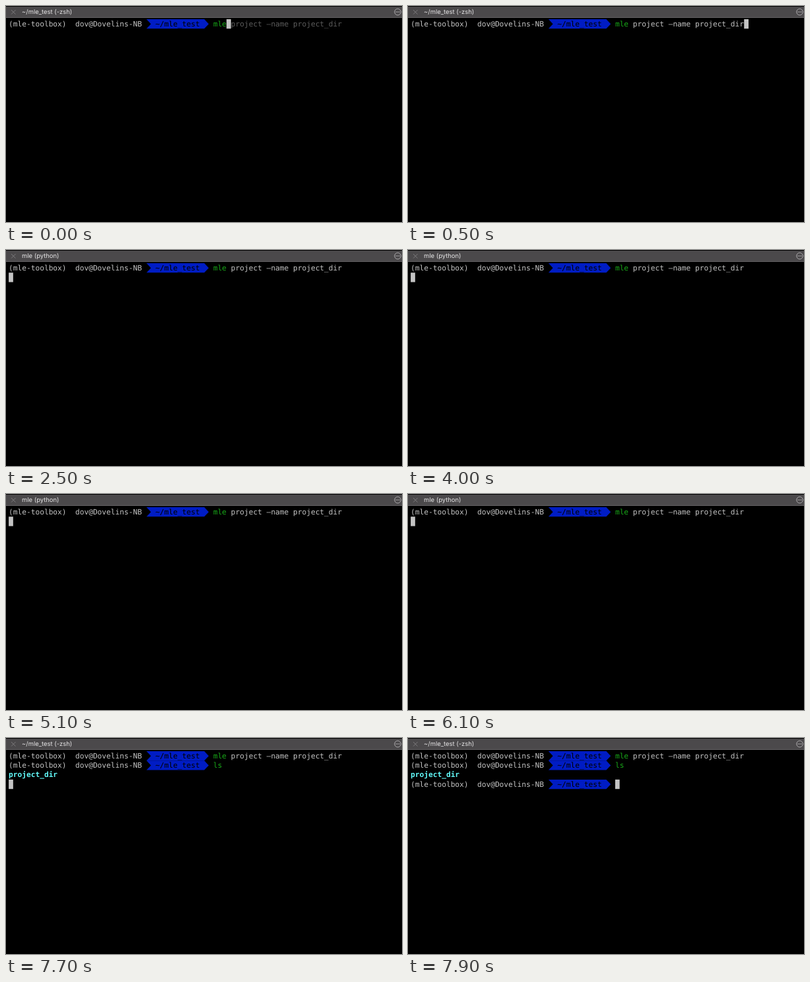
An HTML page for the animation above (8 s loop, 600 by 327 pixels).

```html
<!DOCTYPE html>
<html lang="en">
<head>
<meta charset="utf-8">
<title>Terminal</title>
<style>
html, body { margin: 0; width: 100%; height: 100%; overflow: hidden; background: #000; }
svg { display: block; }
text { white-space: pre; text-rendering: geometricPrecision; }
#screen text { font: 11.187px "DejaVu Sans Mono", monospace; fill: #c3c3c3; }
#screen .green { fill: #18a818; }
#screen .dim { fill: #5c5c5c; }
#screen .path { fill: #000; }
#screen .dir { fill: #62fbfb; font-weight: bold; }
#title { font: 9.45px Inter, "Liberation Sans", sans-serif; fill: #e6e5e6; }
</style>
</head>
<body>
<svg width="600" height="327" viewBox="0 0 600 327">
  <rect width="600" height="327"/>
  <rect y="1" width="600" height="17" fill="#4b494b"/>
  <rect y="17" width="600" height="1" fill="#636163"/>
  <path d="M8 6l6.5 6.5M14.5 6L8 12.5" stroke="#7b797b"/>
  <text id="title" x="24" y="12.4"></text>
  <g fill="#b5b3b5">
    <circle cx="593.5" cy="9" r="4.8" fill="none" stroke="#b5b3b5" stroke-width=".9"/>
    <circle cx="591.2" cy="9" r=".8"/>
    <circle cx="593.5" cy="9" r=".8"/>
    <circle cx="595.8" cy="9" r=".8"/>
  </g>
  <g id="screen"></g>
</svg>
<script>
const LOOP = 8000, LEFT = 4.1, TOP = 20, CELL = 6.735, LINE = 14.3;
const title = document.getElementById('title');
const screen = document.getElementById('screen');
const colX = col => LEFT + col * CELL;
const rowY = row => TOP + row * LINE;

const put = (row, col, text, style = '') =>
  `<text class="${style}" x="${colX(col)}" y="${rowY(row) + 10.8}">${text}</text>`;

const cursor = (row, col) =>
  `<rect x="${colX(col)}" y="${rowY(row)}" width="${CELL}" height="${LINE}" fill="#c4c4c4"/>`;

function prompt(row) {
  const y = rowY(row), mid = y + LINE / 2, end = y + LINE;
  const a = colX(31), b = colX(44);
  return put(row, 0, '(mle-toolbox)  dov@Dovelins-NB') +
    `<path fill="#001cc4" d="M${a} ${y}H${b}L${b + CELL} ${mid}L${b} ${end}H${a}L${a + CELL} ${mid}Z"/>` +
    put(row, 33, '~/mle_test', 'path');
}

function shellTitle(t) {
  if (t < 1000 || t >= 6900) return '~/mle_test (-zsh)';
  return t < 1900 ? 'mle (-zsh)' : 'mle (python)';
}

function session(t) {
  let out = prompt(0) + put(0, 46, 'mle', 'green') +
    put(0, 50, 'project –name project_dir', t < 500 ? 'dim' : '');
  if (t < 500) return out + cursor(0, 49);
  if (t < 1000) return out + cursor(0, 75);
  if (t < 6900) return out + cursor(1, 0);

  const typed = 'ls'.slice(0, t < 7400 ? 0 : t < 7500 ? 1 : 2);
  out += prompt(1) + put(1, 46, typed, 'green');
  if (t < 7700) return out + cursor(1, 46 + typed.length);

  out += put(2, 0, 'project_dir', 'dir');
  return out + (t < 7900 ? cursor(3, 0) : prompt(3) + cursor(3, 46));
}

let start, shown;
function draw(now) {
  start ??= now;
  const t = (now - start) % LOOP;
  const markup = session(t);
  title.textContent = shellTitle(t);
  if (markup !== shown) screen.innerHTML = shown = markup;
  requestAnimationFrame(draw);
}
requestAnimationFrame(draw);
</script>
</body>
</html>
```
